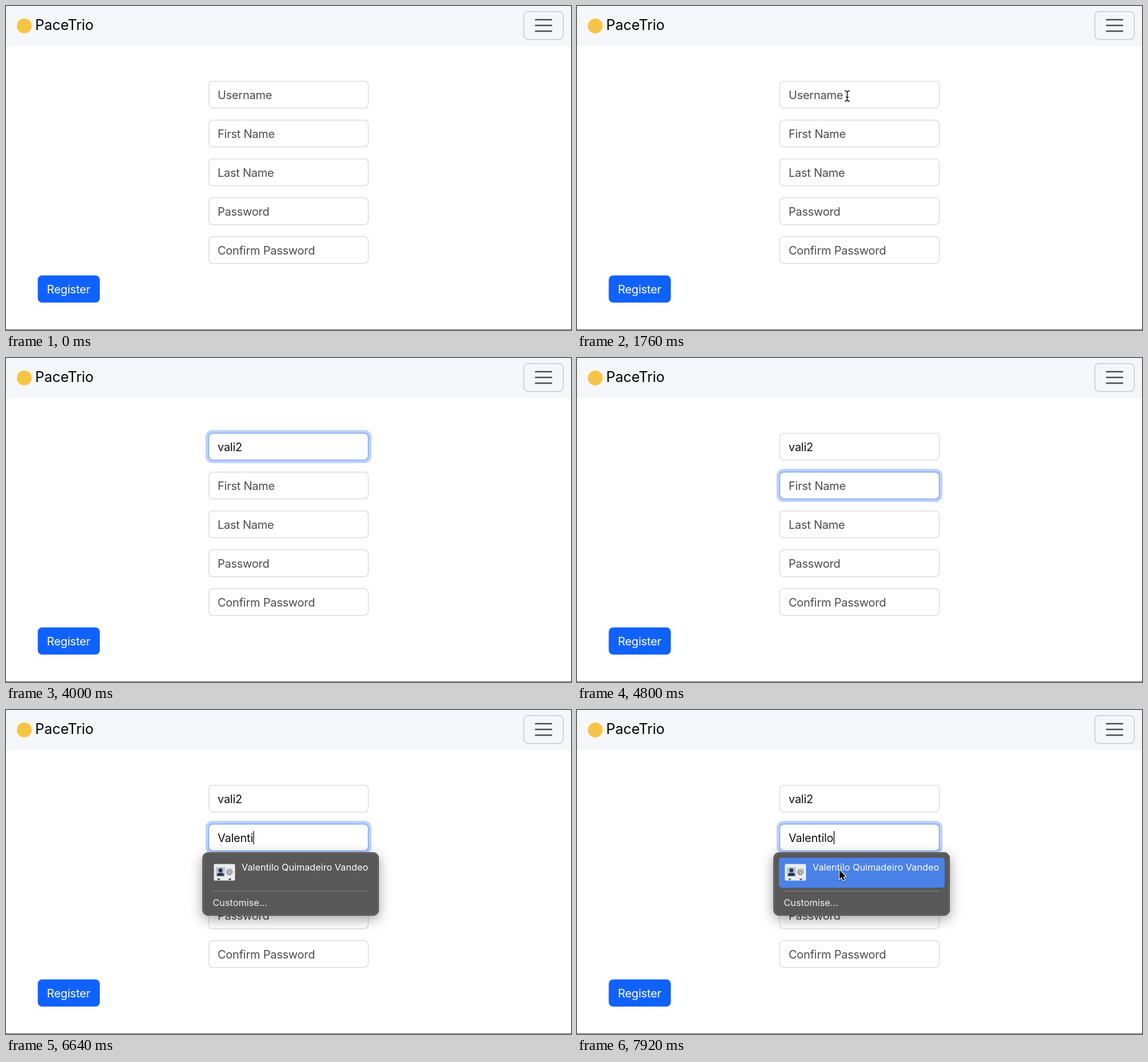
Animation, 988 px wide and 567 px high, one loop 8000 ms. Source, as an HTML page with a canvas:

```html
<!DOCTYPE html>
<html lang="en">
<head>
<meta charset="utf-8">
<title>Register</title>
<style>
  html, body { margin: 0; width: 100%; height: 100%; overflow: hidden; background: #fff; }
  canvas { display: block; }
</style>
</head>
<body>
<canvas id="stage" width="988" height="567"></canvas>
<script>
const ctx = document.getElementById('stage').getContext('2d');
const LOOP = 8000, STEP = 80;
const FIELD = { x: 354.5, y: 131.5, w: 279, h: 47, pitch: 68 };

const labels = ['Username', 'First Name', 'Last Name', 'Password', 'Confirm Password'];
const typed = [
  { text: 'vali2', keys: [2600, 2800, 2960, 3120, 3440] },
  { text: 'Valentilo', keys: [5200, 5440, 5600, 5760, 5920, 6080, 6400, 6720, 6880] }
];
const focusTimes = [2000, 4280];
const POPUP_AT = 6480;
const pointerMoves = [
  { show: 960, hide: 2600, start: 1100, end: 1760, from: [485, 332], to: [472.5, 157.5] },
  { show: 7280, hide: LOOP, start: 7280, end: 7760, from: [472.5, 157.5], to: [458, 279] }
];

const clamp = v => Math.max(0, Math.min(1, v));
const ease = v => { v = clamp(v); return v * v * (3 - 2 * v); };
const fieldY = i => FIELD.y + i * FIELD.pitch;

function box(x, y, w, h, r, fill, stroke, line = 1.25) {
  ctx.beginPath();
  ctx.roundRect(x, y, w, h, r);
  if (fill) { ctx.fillStyle = fill; ctx.fill(); }
  if (stroke) { ctx.strokeStyle = stroke; ctx.lineWidth = line; ctx.stroke(); }
}

function write(str, x, y, size, color, spacing = 0) {
  ctx.font = `${size}px Inter, Roboto, sans-serif`;
  ctx.letterSpacing = spacing + 'px';
  ctx.fillStyle = color;
  ctx.fillText(str, x, y);
  return ctx.measureText(str).width;
}

function polyline(points, color, width) {
  ctx.beginPath();
  points.forEach(([x, y], i) => i ? ctx.lineTo(x, y) : ctx.moveTo(x, y));
  ctx.strokeStyle = color;
  ctx.lineWidth = width;
  ctx.stroke();
}

function header() {
  ctx.fillStyle = '#f5f6fa';
  ctx.fillRect(0, 0, 988, 70.5);
  ctx.fillStyle = '#f6c545';
  ctx.beginPath();
  ctx.arc(32, 35, 13, 0, 7);
  ctx.fill();
  write('PaceTrio', 51, 42, 25, '#000');
  box(905.5, 9.5, 69, 49, 8, null, '#bfc0c5');
  ctx.lineCap = 'round';
  for (const y of [24, 34, 44]) polyline([[926, y], [954, y]], '#4b4b4e', 2.4);
  ctx.lineCap = 'butt';
}

function field(i, t) {
  const { x, w, h } = FIELD, y = fieldY(i);
  const on = focusTimes[i] ?? Infinity, off = focusTimes[i + 1] ?? Infinity;
  const glow = ease((t - on) / 150) * (1 - ease((t - off) / 150));
  if (glow) box(x - 5.5, y - 5.5, w + 11, h + 11, 12, `rgba(20,100,253,${0.29 * glow})`);
  box(x, y, w, h, 7, '#fff', '#d5d7da');
  if (glow) box(x, y, w, h, 7, null, `rgba(113,158,240,${glow})`);

  const keys = typed[i]?.keys ?? [];
  const count = keys.filter(k => k <= t).length;
  const value = count ? typed[i].text.slice(0, count) : '';
  const width = write(value || labels[i], x + 15.5, y + 31, 20, value ? '#111' : '#4b4c4f', -0.25);

  if (t >= on && t < off) {
    const since = t - (count ? keys[count - 1] : on);
    if (since % 1000 < 500) {
      ctx.fillStyle = '#000';
      ctx.fillRect(x + 16 + (value ? width : 0), y + 12.5, 1.3, 23);
    }
  }
}

function contactIcon(back) {
  box(363.5, 269.5, 37, 29, 2, '#ececed');
  box(367, 275, 16, 16, 0, '#b8c5d4');
  ctx.fillStyle = '#26374a';
  ctx.beginPath();
  ctx.arc(375, 280.5, 3.5, 0, 7);
  ctx.fill();
  box(369, 285, 12, 5.5, [4, 4, 0, 0], '#26374a');
  write('@', 385, 287, 12, '#444');
  ctx.fillStyle = back;
  for (const x of [372, 391.5]) {
    ctx.beginPath();
    ctx.moveTo(x - 3, 295);
    ctx.lineTo(x + 3, 295);
    ctx.lineTo(x, 298.5);
    ctx.fill();
  }
}

function popup(hover) {
  ctx.save();
  ctx.shadowColor = 'rgba(0,0,0,.38)';
  ctx.shadowBlur = 22;
  ctx.shadowOffsetY = 6;
  box(343.5, 249, 308.5, 111, 10, '#585858');
  ctx.restore();
  box(344, 249.5, 307.5, 110, 10, null, '#3c3c3c', 1);
  box(345, 250.5, 305.5, 108, 9, null, '#777', 1);
  if (hover) box(353, 258.5, 290, 52.5, 5, '#4a82e8');
  contactIcon(hover ? '#2f62c4' : '#3c3c3c');
  write('Valentilo Quimadeiro Vandeo', 412, 281, 16.25, '#fff');
  polyline([[362, 317], [634, 317]], '#858585', 1.2);
  write('Customise…', 361.5, 343, 16.25, '#f2f2f2');
}

function arrow(x, y) {
  const outline = [[0, 0], [0, 16], [3.7, 12.6], [6.3, 18.6], [9, 17.4], [6.5, 11.6], [11.3, 11.4]];
  ctx.save();
  ctx.translate(x + 1, y + 1);
  ctx.beginPath();
  outline.forEach(p => ctx.lineTo(...p));
  ctx.closePath();
  ctx.lineJoin = 'round';
  ctx.shadowColor = 'rgba(0,0,0,.4)';
  ctx.shadowBlur = 3;
  ctx.shadowOffsetY = 1.5;
  ctx.strokeStyle = '#fff';
  ctx.lineWidth = 2.4;
  ctx.stroke();
  ctx.shadowColor = 'transparent';
  ctx.fillStyle = '#000';
  ctx.fill();
  ctx.restore();
}

function beam(x, y) {
  for (const [color, width] of [['#fff', 3], ['#111', 1.5]]) {
    polyline([[x, y - 7.5], [x, y + 7.5]], color, width);
    polyline([[x - 2.5, y + 2], [x + 2.5, y + 2]], color, width);
    for (const s of [-1, 1]) {
      polyline([[x - 4.5, y + 9 * s], [x - 2, y + 9 * s], [x, y + 7 * s],
                [x + 2, y + 9 * s], [x + 4.5, y + 9 * s]], color, width);
    }
  }
}

function pointerAt(t) {
  const m = pointerMoves.find(p => t >= p.show && t < p.hide);
  if (!m) return null;
  const k = ease((t - m.start) / (m.end - m.start));
  return m.from.map((v, i) => v + (m.to[i] - v) * k);
}

function draw(t) {
  ctx.fillStyle = '#fff';
  ctx.fillRect(0, 0, 988, 567);
  header();
  labels.forEach((_, i) => field(i, t));
  box(55.5, 471.5, 108.5, 47.5, 7.5, '#1062fe');
  write('Register', 71.5, 502.5, 20, '#fff', -0.2);
  ctx.fillStyle = '#808080';
  ctx.fillRect(0, 565.7, 988, 1.3);

  const pos = pointerAt(t), open = t >= POPUP_AT;
  if (open) popup(pos && pos[1] > 258 && pos[1] < 311);
  if (pos) {
    const y = pos[1];
    const overPopup = open && y > 249;
    const overField = labels.some((_, i) => y >= fieldY(i) && y <= fieldY(i) + FIELD.h);
    (overField && !overPopup ? beam : arrow)(...pos);
  }
}

let begin;
function tick(now) {
  begin ??= now;
  draw(Math.floor((now - begin) % LOOP / STEP) * STEP);
  requestAnimationFrame(tick);
}
requestAnimationFrame(tick);
</script>
</body>
</html>
```
